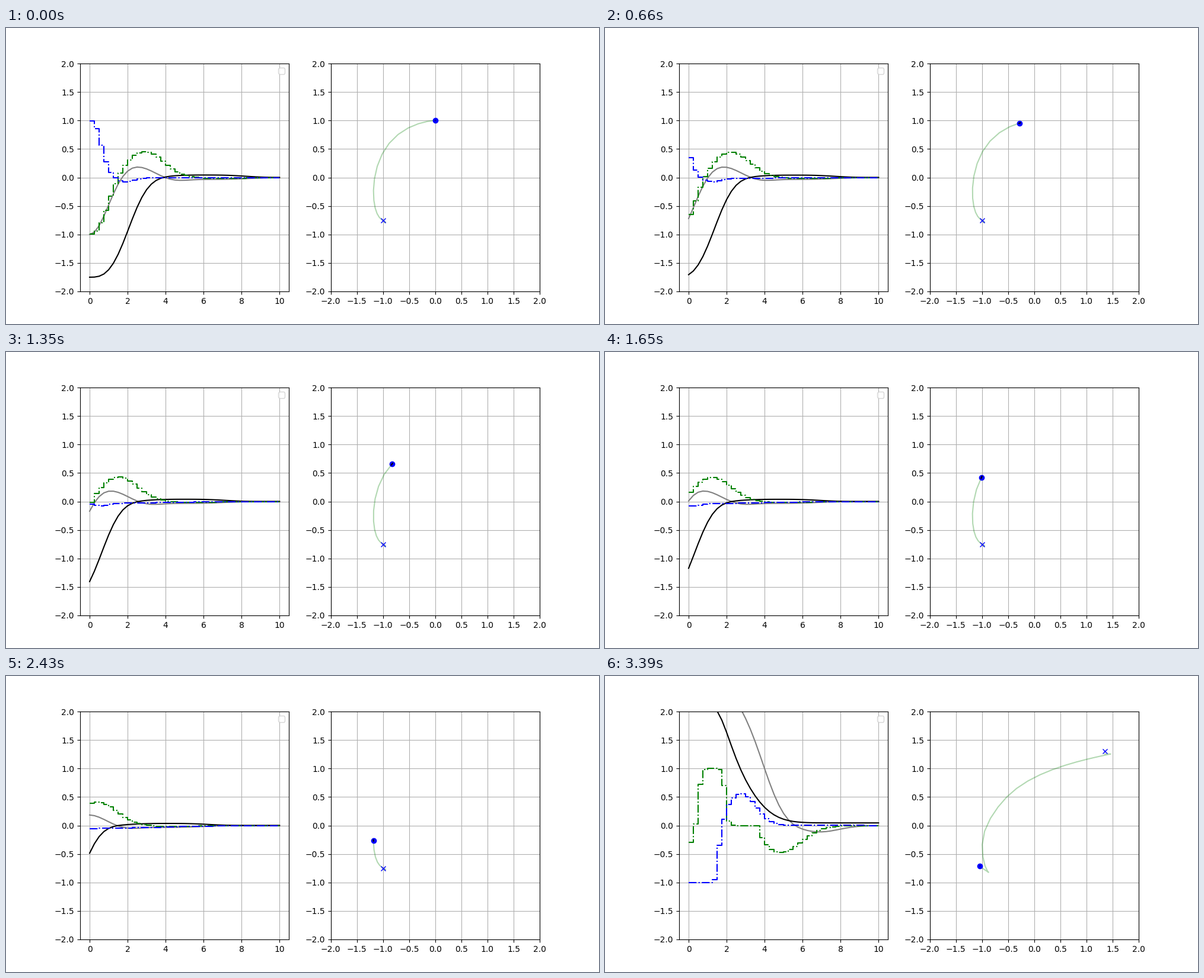
Recreate the animation shown at these times as a matplotlib script. Size 1000 by 500 pixels, loop 3.42 s.

```python
import numpy as np
import matplotlib.pyplot as plt
from matplotlib.animation import FuncAnimation

FRAMES, INTERVAL = 114, 30
SWITCH = 109            # frame at which the goal jumps
REPLAN_TIME = 3.39      # time origin of the second plan
GOALS = np.array([[-1, -0.75], [1.35, 1.3]])
TAU = np.linspace(0, 10, 41)


def bump(s, center, width, power=2):
    return np.exp(-np.abs((s - center) / width) ** power)


def decay(s, scale, power=2):
    return np.exp(-(np.maximum(s, 0) / scale) ** power)


def first_plan(t):
    """Errors and controls while reversing towards the first goal."""
    # The robot runs slightly ahead of its own prediction.
    s = 1.05 * t + TAU
    late = t + TAU
    error_x = (0.154 * s**2 * decay(s, 2.1) - decay(s, np.sqrt(2))
               - 0.05 * bump(s, 4.3, 1) - 0.033 * bump(late, 6, 2.8, 3))
    error_y = (-1.75 * decay(s, 2.35, 3)
               + (0.043 - 0.003 * t) * bump(late, 6.1 + 0.2 * t, 2.4, 3))

    s = 1.02 * t + TAU
    accel = (0.455 * (1 - 0.04 * t) * bump(s, 2.8, 1.4)
             - decay(s, 1.063, 2.2) - 0.02 * bump(s, 6.8, 1.5))
    turn = (decay(s, 0.677) - 0.065 * (1 - 0.25 * t) * bump(s, 1.8, 0.6)
            - (0.012 + 0.016 * t) * decay(TAU, 5))
    return error_x, error_y, accel, turn


def second_plan(t):
    """Back off, turn at full rate, cruise, then brake at the second goal."""
    s = t - REPLAN_TIME + TAU
    error_x = (2.4 * decay(s, 4.123, 4.4) - 0.17 * bump(s, 1, 0.6)
               + 0.065 * bump(s, 2.2, 0.45) - 0.113 * bump(s, 6.9, 1.45))
    error_y = 0.045 + 1.94 * decay(s, 3.047, 2.47) + 0.335 * bump(s, 1.45, 0.88)

    brake = 1 - np.exp(-np.maximum(s - 3.5, 0) / 0.25)
    accel = (bump(s, 1.12, 0.75, 6) - 0.3 * bump(s, 0, 0.2)
             - 0.475 * brake * bump(s, 4.7, 1.6))
    turn = 0.56 * bump(s, 2.65, 1.1) - 2 * decay(s, 1.4, 4)
    return error_x, error_y, accel, turn


def plan(frame):
    t = frame * INTERVAL / 1000
    stage = int(frame >= SWITCH)
    error_x, error_y, accel, turn = (first_plan, second_plan)[stage](t)
    return GOALS[stage], error_x, error_y, np.clip(accel, -1, 1), np.clip(turn, -1, 1)


fig, (ax, field) = plt.subplots(1, 2, figsize=(10, 5), dpi=100)
line_x, = ax.plot([], [], color="gray")
line_y, = ax.plot([], [], color="black")
line_accel, = ax.plot([], [], "g-.", drawstyle="steps-post")
line_turn, = ax.plot([], [], "b-.", drawstyle="steps-post")
ax.set(xlim=(-0.5, 10.5), ylim=(-2, 2))
ax.legend([], [], loc="upper right")
ax.grid()

path, = field.plot([], [], "g", alpha=0.3)
goal_mark, = field.plot([], [], "bx")
robot, = field.plot([], [], "bo")
velocity, = field.plot([], [], "k", lw=1.5, solid_capstyle="butt")
field.set(xlim=(-2, 2), ylim=(-2, 2))
field.set_xticks(np.arange(-2, 2.1, 0.5))
field.grid()

curves = line_x, line_y, line_accel, line_turn


def update(frame):
    goal, *values = plan(frame)
    for line, value in zip(curves, values):
        line.set_data(TAU, value)
    x, y = goal[0] - values[0], goal[1] - values[1]
    path.set_data(x, y)
    goal_mark.set_data([goal[0]], [goal[1]])
    robot.set_data([x[0]], [y[0]])
    dx, dy = 0.12 * (x[1] - x[0]), 0.12 * (y[1] - y[0])
    velocity.set_data([x[0] - dx, x[0] + dx], [y[0] - dy, y[0] + dy])
    return *curves, path, goal_mark, robot, velocity


anim = FuncAnimation(fig, update, frames=FRAMES, interval=INTERVAL, repeat=True,
                     repeat_delay=0, init_func=lambda: update(0))
plt.show()
```
